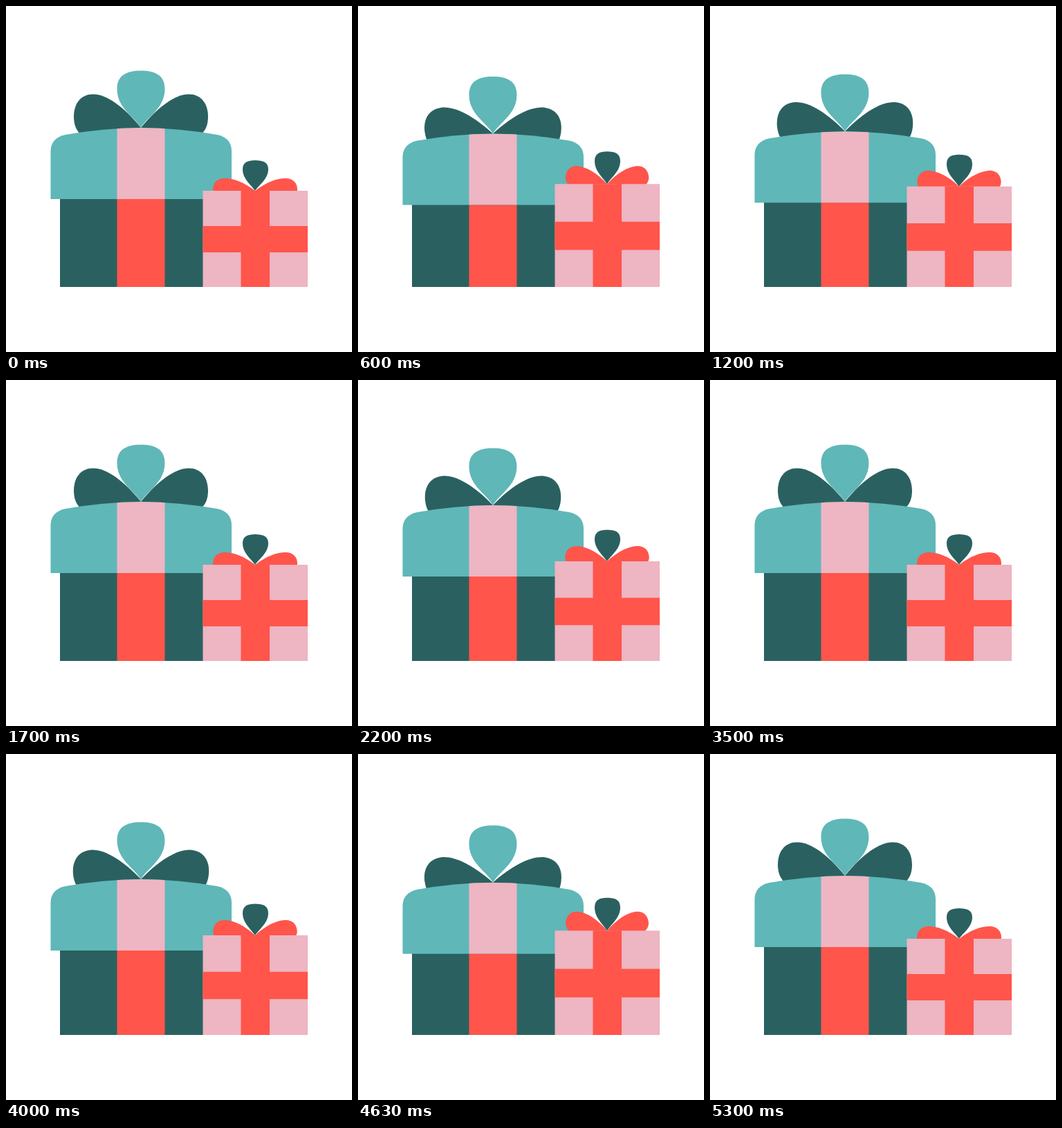
An HTML page for the animation above (5410 ms loop, 500 by 500 pixels).

```html
<!DOCTYPE html>
<html lang="en">
<head>
<meta charset="utf-8">
<title>Gift boxes</title>
<style>
  html, body { margin: 0; width: 100%; height: 100%; overflow: hidden; background: #fff; }
  svg { display: block; width: 100%; height: 100%; }
  .teal { fill: #5fb7b8; }
  .dark { fill: #2a6160; }
  .pink { fill: #eeb5c2; }
  .red { fill: #ff554b; }
</style>
</head>
<body>
<svg viewBox="0 0 500 500">
  <defs>
    <path id="lidShape" d="M64.5 279V210C64.5 197 72 189 86 186Q140 176.5 195 176Q251 176.5 305 186C319 189 326 197 326 210V279Z"/>
    <clipPath id="lidClip"><use href="#lidShape"/></clipPath>
    <path id="bigLeaf" d="M195 176C170 145 145 127.5 126 127.5C108 127.5 98 141 98 160C98 172 102 181 109 186Z"/>
    <path id="smallLeaf" d="M360 267C343 254 328 249 316 249C305 249 299 256 299 265C299 271 303 276 310 279Z"/>
  </defs>

  <g>
    <path class="dark" d="M78 270H312V406H78Z"/>
    <path class="red" d="M160.5 270H229.5V406H160.5Z"/>
    <g id="lid">
      <g class="dark">
        <use id="bigLeft" href="#bigLeaf"/>
        <use id="bigRight" href="#bigLeaf"/>
      </g>
      <path class="teal" d="M195 176C186 160 160.5 148 160.5 120C160.5 101 173 93.5 195 93.5C217 93.5 229.5 101 229.5 120C229.5 148 204 160 195 176Z"/>
      <use class="teal" href="#lidShape"/>
      <path class="pink" clip-path="url(#lidClip)" d="M160.5 170H229.5V279H160.5Z"/>
    </g>
  </g>

  <g id="small">
    <g class="red">
      <use id="smallLeft" href="#smallLeaf"/>
      <use id="smallRight" href="#smallLeaf"/>
    </g>
    <path class="dark" d="M360 267C354 258 342 250 342 236C342 226 349 223 360 223C372 223 379 226 379 236C379 250 366 258 360 267Z"/>
    <path class="pink" d="M284.5 267H436V406H284.5Z"/>
    <path class="red" d="M339.5 267H381V406H339.5ZM284.5 318H436V356H284.5Z"/>
  </g>
</svg>
<script>
  const LOOP = 5410, CYCLE = 1800, PEAK = 870, REST = 1720;
  const $ = id => document.getElementById(id);
  const place = (id, value) => $(id).setAttribute('transform', value);

  // cubic-bezier(x1, 0, x2, 1)
  const ease = (x1, x2) => x => {
    let lo = 0, hi = 1;
    for (let i = 0; i < 24; i++) {
      const s = (lo + hi) / 2, r = 1 - s;
      if (3 * r * r * s * x1 + 3 * r * s * s * x2 + s ** 3 < x) lo = s;
      else hi = s;
    }
    return lo * lo * (3 - 2 * lo);
  };

  const bigRise = ease(.37, .55), smallRise = ease(.45, .6), fall = ease(.6, .1);

  const swing = (t, rise) =>
    t < PEAK ? rise(t / PEAK)
    : t < REST ? 1 - fall((t - PEAK) / (REST - PEAK))
    : 0;

  // Turns both leaves of a bow around their shared tip, the right one mirrored.
  function turnLeaves(name, angle, x, y) {
    const turn = `rotate(${angle} ${x} ${y})`;
    place(name + 'Left', turn);
    place(name + 'Right', `matrix(-1 0 0 1 ${2 * x} 0) ${turn}`);
  }

  // Twenty poses a second, alternately held for 30 and 70 ms.
  function poseTime(now) {
    const t = Math.min(now % LOOP, 3 * CYCLE - 1) % CYCLE;
    return Math.floor(t / 100) * 100 + (t % 100 >= 30 ? 50 : 0);
  }

  function draw(now) {
    const t = poseTime(now);
    const big = swing(t, bigRise), small = swing(t, smallRise);

    place('lid', `translate(0 ${10.4 * big})`);
    turnLeaves('big', -10.4 * big, 195, 176);

    place('small', `translate(0 406) scale(1 ${1 + .09 * small}) translate(0 -406)`);
    turnLeaves('small', 10.4 * small, 360, 267);
  }

  function tick() {
    draw(performance.now());
    requestAnimationFrame(tick);
  }
  tick();
</script>
</body>
</html>
```
